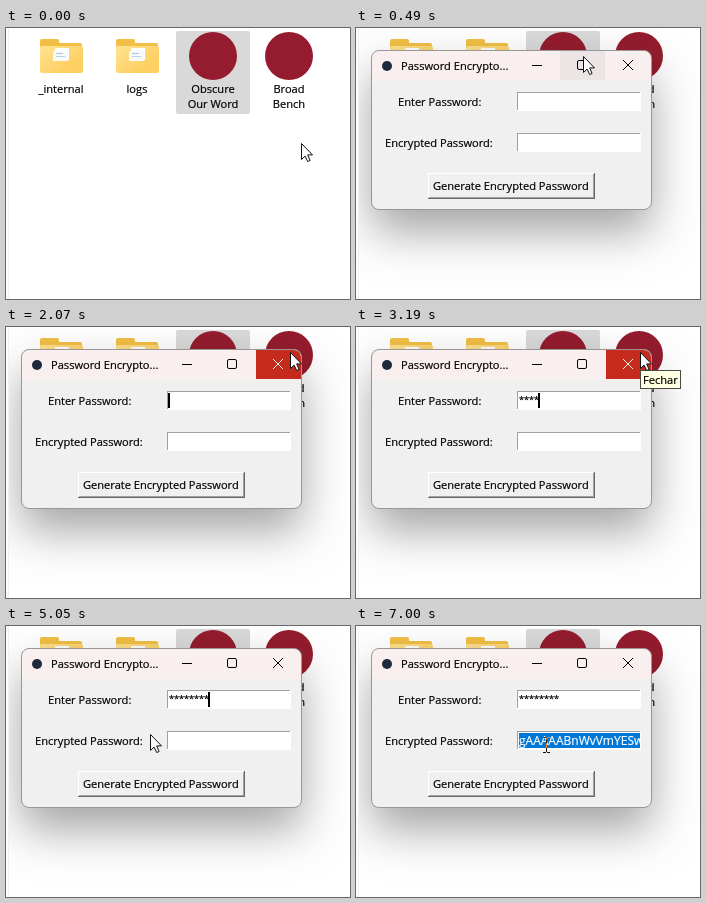
An HTML page with a canvas for the animation above (7130 ms loop, 344 by 271 pixels).

```html
<!DOCTYPE html>
<html lang="en">
<head>
<meta charset="utf-8">
<title>Password tool</title>
<style>
  html, body { margin: 0; width: 100%; height: 100%; overflow: hidden; background: #fff; }
  canvas { display: block; }
</style>
</head>
<body>
<canvas id="stage" width="344" height="271"></canvas>
<script>
const ctx = document.getElementById('stage').getContext('2d');
const LOOP = 7130;
const TEXT_SIZE = 11.1;
const TOKEN = 'gAAAAABnWvVmYESwq3';
const FIELDS = [{ x: 161, y: 64, w: 124, h: 19 }, { x: 161, y: 105, w: 124, h: 19 }];
const KEY_TIMES = [2700, 2840, 3050, 3180, 3940, 4010, 4220, 4570];

// Pointer waypoints: time, x, y
const POINTER = [
  [0, 295, 115], [70, 295, 115], [140, 290, 108], [280, 290, 108], [490, 227, 28],
  [600, 226, 30], [900, 200, 75], [1100, 200, 75], [1300, 255, 62], [1440, 283, 47],
  [1510, 288, 42], [1680, 288, 42], [1790, 284, 25], [4840, 284, 25], [5050, 144, 108],
  [5540, 165, 155], [6160, 165, 155], [6620, 190, 119], [LOOP, 190, 119]
];

const ramp = (t, start, length) => Math.min(1, Math.max(0, (t - start) / length));
const between = (t, a, b) => t >= a && t < b;
const inside = (p, r) => p.x >= r.x && p.x < r.x + r.w && p.y >= r.y && p.y < r.y + r.h;

function pointerAt(t) {
  const i = Math.max(1, POINTER.findIndex(p => p[0] > t));
  const [t0, x0, y0] = POINTER[i - 1], [t1, x1, y1] = POINTER[i];
  const k = (t - t0) / (t1 - t0);
  return { x: Math.round(x0 + (x1 - x0) * k), y: Math.round(y0 + (y1 - y0) * k) };
}

function rect(x, y, w, h, color) {
  ctx.fillStyle = color;
  ctx.fillRect(x, y, w, h);
}

function roundRect(x, y, w, h, r, fill, stroke) {
  ctx.beginPath();
  ctx.roundRect(x, y, w, h, r);
  if (fill) { ctx.fillStyle = fill; ctx.fill(); }
  if (stroke) { ctx.strokeStyle = stroke; ctx.stroke(); }
}

// A hairline stroke gives the small type its crisp, dark look
function text(str, x, y, { align = 'left', color = '#000', size = TEXT_SIZE } = {}) {
  ctx.font = `${size}px "Open Sans", "Noto Sans", sans-serif`;
  ctx.textAlign = align;
  ctx.fillStyle = ctx.strokeStyle = color;
  ctx.fillText(str, x, y);
  ctx.lineWidth = 0.2;
  ctx.strokeText(str, x, y);
  ctx.lineWidth = 1;
}

function line(points, color) {
  ctx.beginPath();
  points.forEach(([x, y]) => ctx.lineTo(x, y));
  ctx.strokeStyle = color;
  ctx.stroke();
}

function disc(x, y, r, color) {
  ctx.beginPath();
  ctx.arc(x, y, r, 0, Math.PI * 2);
  ctx.fillStyle = color;
  ctx.fill();
}

// Two-tone edge: one colour on top and left, the other on bottom and right
function bevel({ x, y, w, h }, topLeft, bottomRight) {
  rect(x, y, w, 1, topLeft);
  rect(x, y, 1, h, topLeft);
  rect(x, y + h - 1, w, 1, bottomRight);
  rect(x + w - 1, y, 1, h, bottomRight);
}

function folder(x, label) {
  roundRect(x, 11, 19, 16, 2, '#f1bf45');
  roundRect(x, 15, 42, 20, 2, '#f1bf45');
  const front = ctx.createLinearGradient(x, 17, x + 20, 45);
  front.addColorStop(0, '#ffe394');
  front.addColorStop(1, '#fdd062');
  roundRect(x, 18, 43, 27, 2, front);
  rect(x + 15, 20, 14, 12, '#fff');
  rect(x + 13, 23, 15, 10, '#f7f8f8');
  rect(x + 16, 25, 7, 1, '#a9cbe0');
  rect(x + 16, 28, 9, 1, '#bdd2de');
  text(label, x + 21, 65, { align: 'center' });
}

function appIcon(x, lines) {
  disc(x, 28, 24, '#941c2e');
  lines.forEach((s, i) => text(s, x, 65 + i * 15, { align: 'center' }));
}

function desktop() {
  rect(0, 0, 344, 271, '#fff');
  rect(2, 0, 1, 271, '#f0f0f0');
  roundRect(170, 3, 74, 83, 2, '#d9d9d9');
  folder(34, '_internal');
  folder(110, 'logs');
  appIcon(207, ['Obscure', 'Our Word']);
  appIcon(283, ['Broad', 'Bench']);
}

function titleBar(t) {
  roundRect(16, 23, 279, 30, [7, 7, 0, 0], '#f9efef');
  disc(31, 38, 5, '#1c2a3c');
  text('Password Encrypto...', 45, 42);

  ctx.globalAlpha = ramp(t, 410, 80) * (1 - ramp(t, 640, 140));
  rect(204, 23, 45, 29, '#ebe5e5');
  const closeHover = ramp(t, 1410, 140) * (1 - ramp(t, 4880, 140));
  ctx.globalAlpha = closeHover;
  roundRect(250, 23, 45, 29, [0, 7, 0, 0], '#c42b1c');
  ctx.globalAlpha = 1;

  line([[176, 37.5], [186, 37.5]], '#000');
  roundRect(221.5, 32.5, 9, 9, 1.5, null, '#000');
  const crossColor = closeHover > 0.3 ? '#fff0e4' : '#000';
  line([[267, 32], [277, 42]], crossColor);
  line([[277, 32], [267, 42]], crossColor);
}

function fields(t) {
  FIELDS.forEach(f => {
    rect(f.x, f.y, f.w, f.h, '#fff');
    bevel(f, '#a0a0a0', '#fff');
  });

  const typed = KEY_TIMES.filter(k => t >= k).length;
  for (let i = 0; i < typed; i++) text('*', 163 + i * 5, 76, { size: 9.2 });
  if (between(t, 1165, 6640) && (t - 1165) % 905 < 615) rect(162 + typed * 5, 66, 2, 15, '#000');

  if (t >= 5820) {
    const selected = t >= 6790;
    ctx.save();
    ctx.beginPath();
    ctx.rect(162, 106, 122, 17);
    ctx.clip();
    if (selected) rect(163, 107, 121, 15, '#0078d7');
    text(TOKEN, 163, 119, { size: 12, color: selected ? '#fff' : '#000' });
    ctx.restore();
  }
}

function button(t) {
  const box = { x: 72, y: 145, w: 167, h: 26 };
  const pressed = between(t, 5680, 5820);
  rect(box.x, box.y, box.w, box.h, '#f0f0f0');
  bevel(box, pressed ? '#696969' : '#fff', pressed ? '#fff' : '#696969');
  const inner = { x: 73, y: 146, w: 165, h: 24 };
  bevel(inner, pressed ? '#a0a0a0' : '#f0f0f0', pressed ? '#f0f0f0' : '#a0a0a0');
  const shift = pressed ? 1 : 0;
  text('Generate Encrypted Password', 77 + shift, 162 + shift);
}

function appWindow(t) {
  const open = ramp(t, 250, 180);
  if (!open) return;
  const scale = 0.9 + 0.1 * (1 - (1 - open) ** 3);

  ctx.save();
  ctx.translate(155, 102);
  ctx.scale(scale, scale);
  ctx.translate(-155, -102);

  // The body is drawn first, with the soft shadow it casts
  ctx.save();
  ctx.beginPath();
  ctx.rect(3, 0, 341, 271);
  ctx.clip();
  ctx.globalAlpha = open;
  ctx.shadowColor = 'rgba(0,0,0,.36)';
  ctx.shadowBlur = 46;
  ctx.shadowOffsetY = 22;
  roundRect(15.5, 22.5, 280, 159, 7.5, '#f0f0f0');
  ctx.restore();

  if (open > 0.4) {
    titleBar(t);
    text('Enter Password:', 42, 78);
    text('Encrypted Password:', 29, 119);
    fields(t);
    button(t);
  }
  roundRect(15.5, 22.5, 280, 159, 7.5, null, '#9a9696');
  ctx.restore();
}

function tooltip() {
  rect(284, 43, 41, 19, '#4a4a4a');
  rect(285, 44, 39, 17, '#ffffe1');
  text('Fechar', 287, 57);
}

function arrow({ x, y }) {
  ctx.save();
  ctx.translate(x + 0.5, y + 0.5);
  ctx.beginPath();
  [[0, 0], [0, 16], [3.6, 12.6], [6.2, 18], [8.6, 17], [6.2, 11.4], [11, 11.4]]
    .forEach(p => ctx.lineTo(...p));
  ctx.closePath();
  ctx.fillStyle = '#fff';
  ctx.fill();
  ctx.strokeStyle = '#111';
  ctx.stroke();
  ctx.restore();
}

// The text cursor inverts whatever lies beneath it
function textCursor({ x, y }) {
  ctx.globalCompositeOperation = 'difference';
  rect(x, y - 7, 1, 14, '#fff');
  for (const row of [y - 8, y + 7]) {
    rect(x - 3, row, 3, 1, '#fff');
    rect(x + 1, row, 3, 1, '#fff');
  }
  ctx.globalCompositeOperation = 'source-over';
}

function draw(now) {
  const t = now % LOOP;
  const pointer = pointerAt(t);
  desktop();
  appWindow(t);
  if (between(t, 3110, 4900)) tooltip();
  const overField = t > 430 && FIELDS.some(f => inside(pointer, f));
  (overField ? textCursor : arrow)(pointer);
  requestAnimationFrame(draw);
}
requestAnimationFrame(draw);
</script>
</body>
</html>
```
